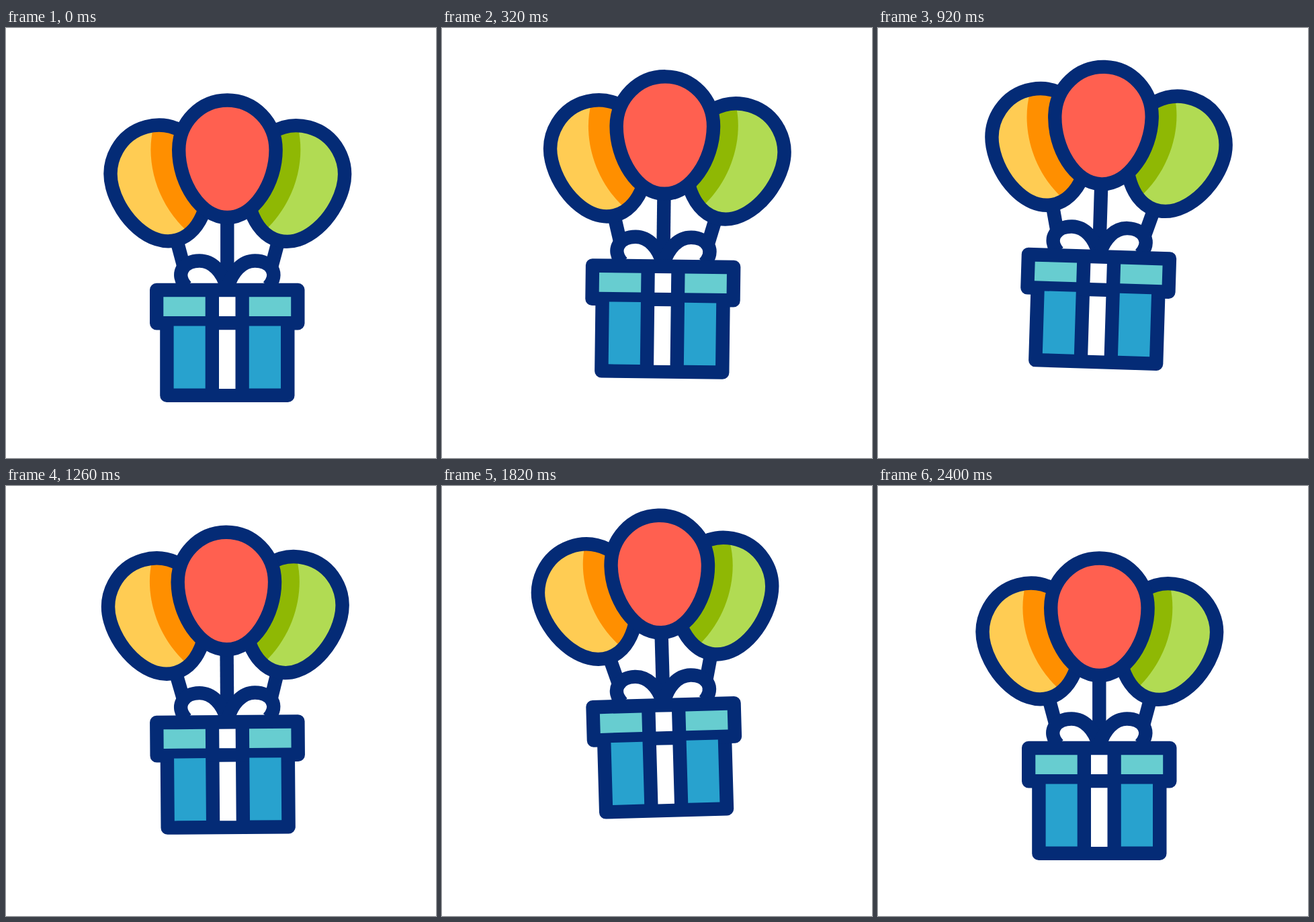
An HTML page for the animation above (2.42 s loop, 640 by 640 pixels).

```html
<!DOCTYPE html>
<html lang="en">
<head>
<meta charset="utf-8">
<title>Balloon gift</title>
<style>
  html, body { margin: 0; width: 100%; height: 100%; overflow: hidden; background: #fff; }
  svg { display: block; width: 100%; height: 100%; }
  .line { fill: none; stroke: #042b76; stroke-width: 20.4; stroke-linejoin: round; }
  .ink { fill: #042b76; }
</style>
</head>
<body>
<svg viewBox="0 0 640 640" xmlns="http://www.w3.org/2000/svg">
  <defs>
    <!-- balloon outline around its widest point -->
    <path id="egg" d="M0-74C40-74 72.2-41 72.2 0C72.2 48.5 40.3 100.5 0 100.5C-40.3 100.5-72.2 48.5-72.2 0C-72.2-41-40-74 0-74Z"/>
    <path id="shade" d="M219 150C208 195 222 258 268 301L340 301V150Z"/>
    <path id="bow" d="M268 385C251 366 264 346.5 288 346.5C308 346.5 322 364 328 384"/>
    <clipPath id="clipL"><use class="left" href="#egg"/></clipPath>
    <clipPath id="clipR"><use class="right" href="#egg"/></clipPath>
  </defs>
  <g id="gift">
    <g class="left">
      <path class="line" d="M0 100V144"/>
      <use href="#egg" fill="#ffcc53"/>
    </g>
    <g clip-path="url(#clipL)"><use href="#shade" fill="#ff8f00"/></g>
    <use class="left line" href="#egg"/>

    <g class="right">
      <path class="line" d="M0 100V144"/>
      <use href="#egg" fill="#b1db53"/>
    </g>
    <g clip-path="url(#clipR)"><use href="#shade" fill="#8fb804" transform="matrix(-1 0 0 1 653.8 0)"/></g>
    <use class="right line" href="#egg"/>

    <path class="line" d="M329.3 282V390"/>
    <g transform="translate(329.4 181.5)">
      <use href="#egg" fill="#ff6050"/>
      <use class="line" href="#egg"/>
    </g>

    <g fill="#fff">
      <use href="#bow"/>
      <use href="#bow" transform="matrix(-1 0 0 1 658.6 0)"/>
    </g>
    <use class="line" href="#bow"/>
    <use class="line" href="#bow" transform="matrix(-1 0 0 1 658.6 0)"/>

    <rect class="ink" x="229.2" y="425" width="200.3" height="131.9" rx="10"/>
    <rect class="ink" x="214" y="379.7" width="230.5" height="69.8" rx="10"/>
    <path fill="#67cdd0" d="M234.3 400.3H296.7V429H234.3ZM361.8 400.3H424.2V429H361.8Z"/>
    <path fill="#28a2ce" d="M249.6 443.6H296.7V536.5H249.6ZM361.8 443.6H409V536.5H361.8Z"/>
    <path fill="#fff" d="M317 400.3H341.5V429H317ZM317 449.3H341.5V537H317Z"/>
  </g>
</svg>
<script>
  const LOOP = 2420, STEP = 20;
  const gift = document.getElementById('gift');
  const lefts = document.querySelectorAll('.left');
  const rights = document.querySelectorAll('.right');

  // value at t along [time, value] keys, eased between each pair
  function track(keys, t) {
    for (let i = 1; i < keys.length; i++) {
      const [t0, a] = keys[i - 1], [t1, b] = keys[i];
      if (t <= t1) {
        const p = (t - t0) / (t1 - t0);
        return a + (b - a) * p * p * (3 - 2 * p);
      }
    }
    return keys[keys.length - 1][1];
  }

  const rise = [[0, 0], [600, -64], [1200, -38], [1800, -64], [2400, 0]];
  const sway = [[0, 0], [800, 1], [1600, -1], [2400, 0]];

  const place = (nodes, value) => nodes.forEach(n => n.setAttribute('transform', value));

  function draw(t) {
    const y = track(rise, t), s = track(sway, t);
    gift.setAttribute('transform', `translate(0 ${y}) rotate(${2 * s} 329.4 380)`);
    place(lefts, `rotate(${3.5 * s} 271 380) translate(228 218.6) rotate(-15)`);
    place(rights, `rotate(${3.5 * s} 388.5 380) translate(431.6 219.2) rotate(15)`);
  }

  const start = performance.now();
  function frame() {
    const t = (performance.now() - start) % LOOP;
    draw(Math.floor(t / STEP) * STEP);
    requestAnimationFrame(frame);
  }
  draw(0);
  requestAnimationFrame(frame);
</script>
</body>
</html>
```
